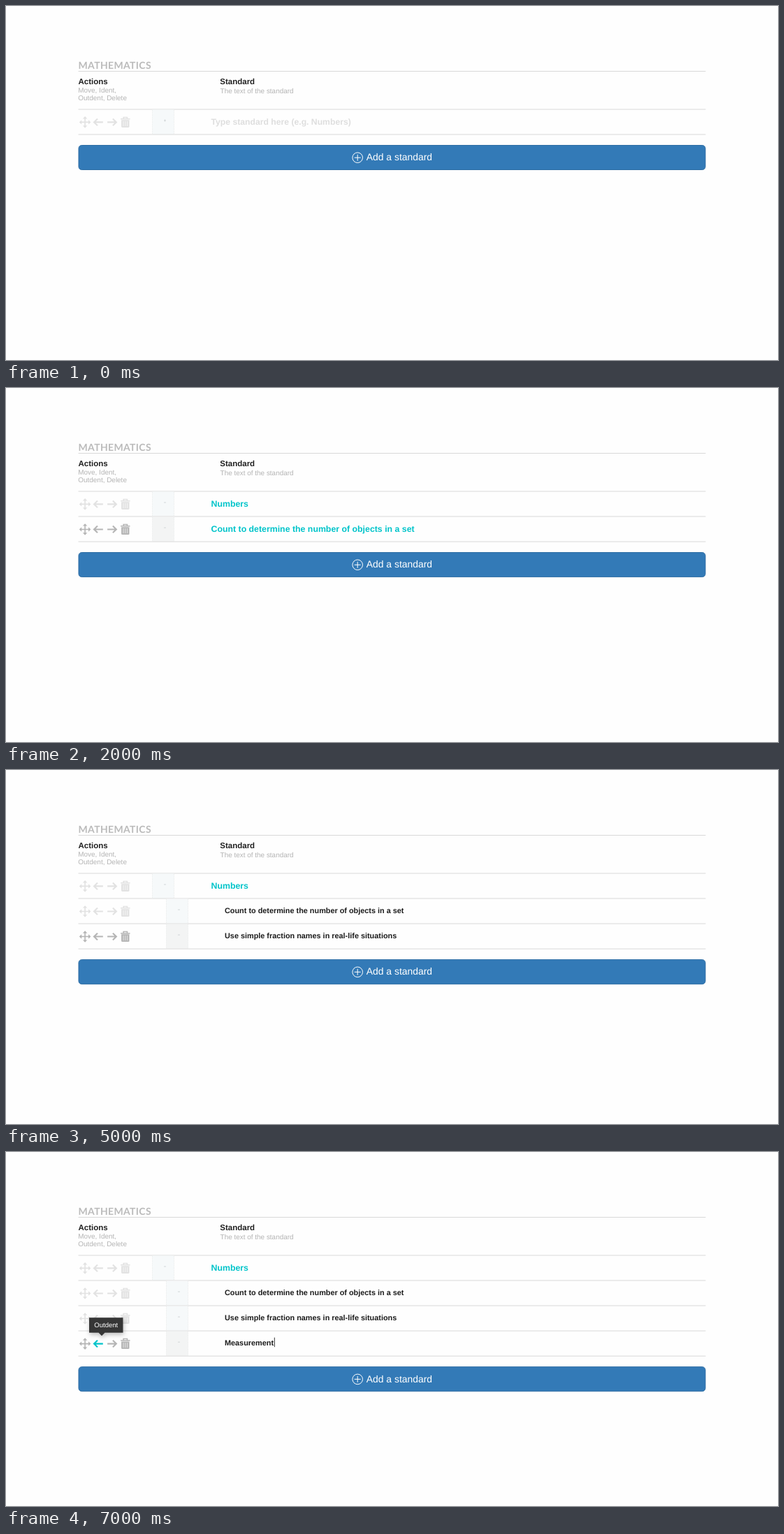
An HTML page for the animation above (8000 ms loop, 1105 px wide and 507 px high).

```html
<!DOCTYPE html>
<html lang="en">
<head>
<meta charset="utf-8">
<title>Standards editor</title>
<style>
  html, body { margin: 0; width: 100%; height: 100%; overflow: hidden; background: #fefefe; }
  svg { display: block; width: 1105px; height: 507px; font-family: "Liberation Sans", Arial, sans-serif; text-rendering: geometricPrecision; }
  .bold { font-weight: 700; }
  .title { font: 700 14px Lato, sans-serif; letter-spacing: .35px; fill: #bbb; }
  .note { font-size: 9.95px; fill: #b4b4b4; }
  .head { font-size: 11.5px; fill: #222; }
  .top { font-size: 12.34px; fill: #00c4ca; }
  .hint { font-size: 12.2px; fill: #dedede; }
  .sub { font-size: 10.86px; fill: #1c1c1c; }
  .label { font-size: 13.9px; fill: #fff; }
  .tip { font-size: 9.5px; fill: #fff; text-anchor: middle; }
  .rule { stroke: #d9d9d9; }
  .arrow { fill: none; stroke-width: 2.1; }
  .bubble { fill: #363636; filter: drop-shadow(1px 3px 3px rgba(0, 0, 0, .25)); }
</style>
</head>
<body>
<svg id="stage" viewBox="0 0 1105 507">
  <defs>
    <g id="move">
      <path d="M-6 0H6M0-6V6" stroke="currentColor" stroke-width="1.6"/>
      <path id="tips" d="M-8.3 0l3.4-3.2v6.4zM8.3 0l-3.4-3.2v6.4zM0-8.3l-3.2 3.4h6.4zM0 8.3l-3.2-3.4h6.4z" fill="currentColor"/>
    </g>
    <path id="arrow" class="arrow" stroke="currentColor" d="M-6.5 0H6.5M1.3-4.9L6.3 0L1.3 4.9"/>
    <g id="trash">
      <path d="M-2.7-5.2V-7H2.7V-5.2M-6.7-4.6H6.7" fill="none" stroke="currentColor" stroke-width="1.5"/>
      <path d="M-5.7-3.2H5.7V6.2Q5.7 7.5 4.4 7.5H-4.4Q-5.7 7.5-5.7 6.2z" fill="currentColor"/>
      <path d="M-2.8-1.5V5.7M0-1.5V5.7M2.8-1.5V5.7" stroke="#fff" stroke-width=".9" opacity=".75"/>
    </g>
  </defs>
  <text class="title" x="103.5" y="90">MATHEMATICS</text>
  <path class="rule" d="M103.5 93.5H1001.5"/>
  <text class="head bold" x="103.5" y="112">Actions</text>
  <text class="note" x="103.3" y="123.7">Move, Ident,</text>
  <text class="note" x="103.3" y="135.3">Outdent, Delete</text>
  <text class="head bold" x="306.3" y="112">Standard</text>
  <text class="note" x="306.6" y="125.3">The text of the standard</text>
  <path class="rule" d="M103.5 148H1001.5"/>
  <g id="rows"></g>
  <g id="button">
    <rect x="104" y="199.5" width="897" height="35" rx="4.5" fill="#337ab7" stroke="#2e6da4"/>
    <circle cx="503.2" cy="217.2" r="7.3" fill="none" stroke="#fff"/>
    <path d="M498.7 217.2h9M503.2 212.7v9" stroke="#fff"/>
    <text class="label" x="515.8" y="221.3">Add a standard</text>
  </g>
  <g id="tooltip"></g>
</svg>
<script>
const STEP = 1000, LOOP = 8000, PITCH = 36.07;
const DIM = '#e2e2e2', ACTIVE = '#b5b5b5', ACCENT = '#00c4ca';
const byId = id => document.getElementById(id);

const hint = { text: 'Type standard here (e.g. Numbers)', style: 'hint', mark: '+' };
const numbers = { text: 'Numbers', style: 'top' };
const countTop = { text: 'Count to determine the number of objects in a set', style: 'top' };
const count = { ...countTop, style: 'sub' };
const fractions = { text: 'Use simple fraction names in real-life situations', style: 'sub' };
const measurement = { text: 'Measurement', style: 'sub', caret: true };

const indent = { text: 'Indent', x: 138, width: 41, tail: 156.5, row: 1 };
const outdent = { text: 'Outdent', x: 119, width: 48.5, tail: 137, row: 3 };

// The last row is the active one; the untouched hint row stays dim.
const states = [
  { rows: [hint] },
  { rows: [numbers] },
  { rows: [numbers, countTop] },
  { rows: [numbers, countTop], tip: indent },
  { rows: [numbers, count], tip: indent },
  { rows: [numbers, count, fractions] },
  { rows: [numbers, count, fractions, measurement] },
  { rows: [numbers, count, fractions, measurement], tip: outdent }
];

const icon = (name, x, color, flip = '') =>
  `<use href="#${name}" transform="translate(${x} 166.4) ${flip}" color="${color}"/>`;

function drawRow(row, index, active, tip) {
  const isSub = row.style === 'sub';
  const shift = isSub ? 20 : 0;
  const color = active ? ACTIVE : DIM;
  const arrowColor = target => active && tip === target ? ACCENT : color;
  const fill = active && index ? '#f3f4f4' : '#f6f9fa';
  const plus = row.mark === '+' ? 'M227.5 162.5v3' : '';
  return `<g transform="translate(0 ${index * PITCH})">
    <rect x="${209.5 + shift}" y="148.5" width="31" height="35" fill="${fill}"/>
    <path d="M${209.5 + shift} 149v34.5m31-34.5v34.5" stroke="#eceeee" stroke-dasharray="1.5 1"/>
    <path d="M${226 + shift} 164h3${plus}" stroke="#cfd3d4" stroke-width=".9"/>
    ${icon('move', 113.1, color)}
    ${icon('arrow', 132.3, arrowColor(outdent), 'scale(-1 1)')}
    ${icon('arrow', 151.6, arrowColor(indent))}
    ${icon('trash', 170.8, color)}
    <text class="${row.style} bold" x="${isSub ? 313 : 293.5}" y="${isSub ? 169.2 : 170}">${row.text}</text>
    ${row.caret ? '<path d="M384.3 157.5v13.5" stroke="#333"/>' : ''}
    <path class="rule" d="M103.5 184H1001.5"/>
  </g>`;
}

function drawTip({ text, x, width, tail, row }) {
  const y = 129 + row * PITCH;
  return `<path class="bubble" d="M${x} ${y}h${width}v21.5H${tail + 4.5}l-4.5 4.5l-4.5-4.5H${x}z"/>
    <text class="tip" x="${x + width / 2}" y="${y + 14}">${text}</text>`;
}

function draw({ rows, tip }) {
  const last = rows.length - 1;
  byId('rows').innerHTML = rows.map((row, i) =>
    drawRow(row, i, i === last && row !== hint, tip)).join('');
  byId('button').setAttribute('transform', `translate(0 ${last * PITCH})`);
  byId('tooltip').innerHTML = tip ? drawTip(tip) : '';
}

let start, shown = -1;
function tick(now) {
  start ??= now;
  const step = Math.floor((now - start) % LOOP / STEP);
  if (step !== shown) draw(states[shown = step]);
  requestAnimationFrame(tick);
}
draw(states[0]);
requestAnimationFrame(tick);
</script>
</body>
</html>
```
